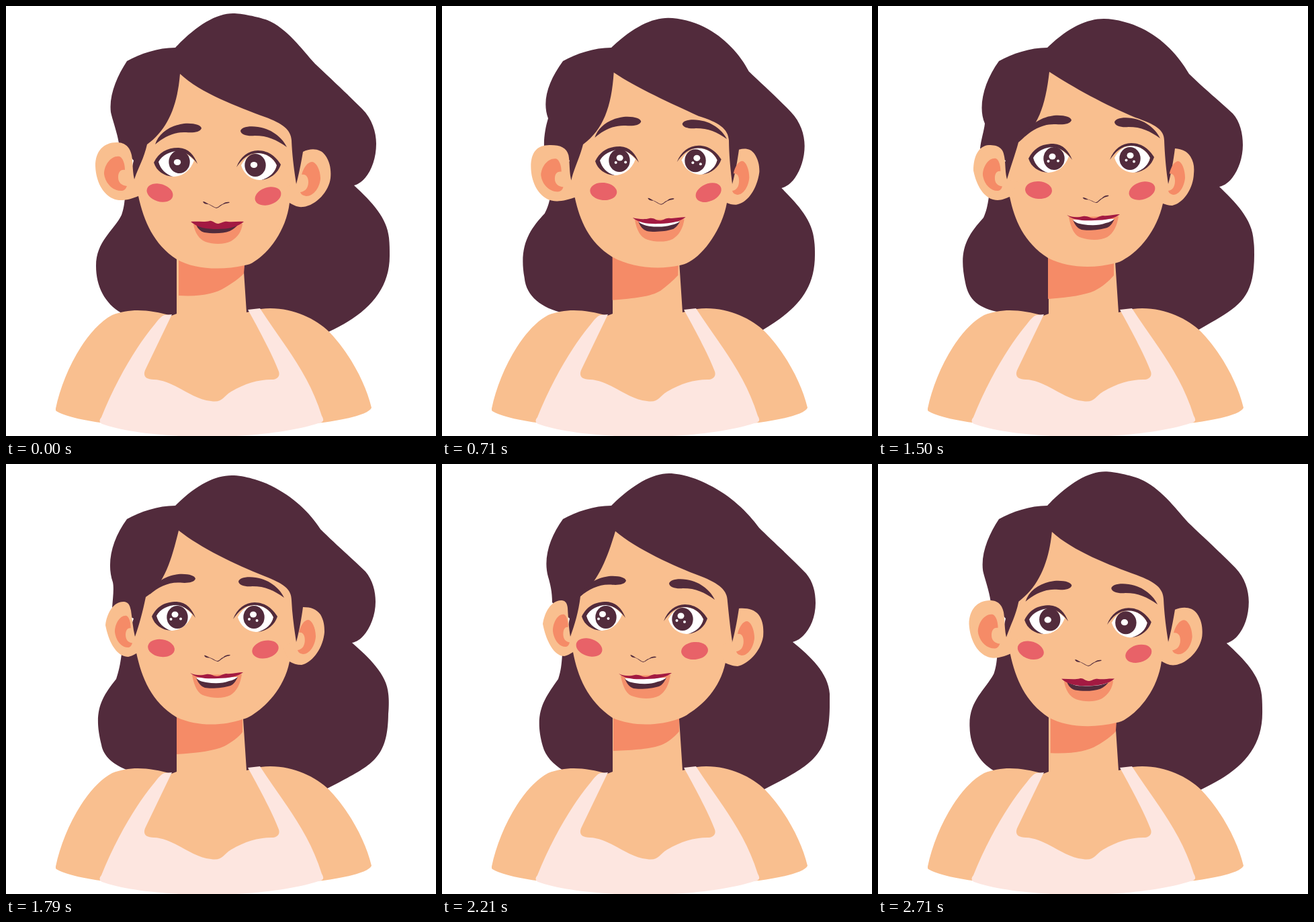
An HTML page for the animation above (2780 ms loop, 640x640 px).

```html
<!DOCTYPE html>
<html lang="en">
<head>
<meta charset="utf-8">
<title>Portrait</title>
<style>
html, body { margin: 0; width: 100%; height: 100%; overflow: hidden; background: #fff; }
svg { display: block; width: 100%; height: 100%; }
</style>
</head>
<body>
<svg id="stage" viewBox="0 0 640 640"></svg>
<script>
const NS = 'http://www.w3.org/2000/svg';
const stage = document.getElementById('stage');
const LOOP = 2780, STEPS = 39;
const HAIR = '#522b3c', SKIN = '#f9bf8f', BLUSH = '#e86268', SHADE = '#f58b67', DRESS = '#fde6e0', LIP = '#a31a42';
const TIMES = [0, 15, 16, 21, 25, 31, 32, 39];
const updates = [];

const mix = (a, b, u) => a.map((v, i) => v + (b[i] - v) * u);

// Five poses become a looping track whose turning points overshoot by one step.
function track(poses) {
  const [a, b, c, d, e] = poses;
  const vals = [a, b, mix(a, b, 16 / 15), c, d, e, mix(d, e, 7 / 6), a];
  return step => {
    let i = 0;
    while (step >= TIMES[i + 1]) i++;
    return mix(vals[i], vals[i + 1], (step - TIMES[i]) / (TIMES[i + 1] - TIMES[i]));
  };
}

function add(tag, attrs, parent = stage) {
  const el = document.createElementNS(NS, tag);
  for (const k in attrs) el.setAttribute(k, attrs[k]);
  return parent.appendChild(el);
}

const fixed = (fill, d, parent) => add('path', { fill, d }, parent);

function morph(fill, paths, parent) {
  const el = add('path', { fill }, parent);
  const num = /-?\d+(\.\d+)?/g;
  const gaps = paths[0].split(/-?\d+(?:\.\d+)?/);
  const at = track(paths.map(p => p.match(num).map(Number)));
  updates.push(s => {
    const v = at(s);
    el.setAttribute('d', gaps.map((g, i) => g + (i < v.length ? v[i].toFixed(2) : '')).join(''));
  });
}

// Poses are [x, y, angle].
function move(poses, parent) {
  const g = add('g', {}, parent), at = track(poses);
  updates.push(s => {
    const [x, y, r = 0] = at(s);
    g.setAttribute('transform', `translate(${x} ${y}) rotate(${r})`);
  });
  return g;
}

// Poses are [left, top, right, bottom, angle]; the first is the drawn size.
function fit(poses) {
  const g = add('g', {}), at = track(poses), [l, t, r, b] = poses[0];
  updates.push(s => {
    const [x, y, x2, y2, turn = 0] = at(s);
    g.setAttribute('transform', `translate(${(x + x2) / 2} ${(y + y2) / 2}) rotate(${turn}) ` +
      `scale(${(x2 - x) / (r - l)} ${(y2 - y) / (b - t)}) translate(${-(l + r) / 2} ${-(t + b) / 2})`);
  });
  return g;
}

const dot = (fill, cx, cy, rx, ry, parent) => add('ellipse', { fill, cx, cy, rx, ry }, parent);

// Hair
const crown = ' 180 82C200 71 226 62 252 62Z';
morph(HAIR, [
  'M252 62C283 29 313 11 338 11C350 11 375 16 389 21C418 33 440 64 460 86C480 105 505 128 530 153C545 168 551 188 551 205C551 235 537 262 518 267C545 292 567 315 570 345C571 355 571 362 571 372C571 425 535 460 480 485L300 500 172 457C147 443 134 417 134 387C134 350 160 335 172 311C175 302 176 296 177 285L190 230 168 204C166 190 158 168 156 158C153 133 165 105',
  'M252 62C283 34 311 21 336 21C355 21 375 27 390 36C422 53 446 77 455 103C470 118 490 135 514 160C528 175 534 193 534 210C534 238 519 268 499 273C520 295 544 320 546 352C547 358 547 364 547 370C547 425 520 450 476 481L300 500 185 457C150 453 121 441 117 413C104 360 116 331 143 308C148 300 150 295 153 285L190 230 144 212C144 200 152 186 159 172C146 145 155 115',
  'M252 62C283 32 311 19 336 19C355 19 378 26 392 33C425 49 448 75 463 101C480 118 503 137 528 160C539 172 543 190 543 207C543 235 528 265 508 269C530 290 558 317 559 350C560 357 560 362 560 370C560 440 535 448 477 482L300 500 182 456C150 450 135 438 130 412C120 365 130 345 157 315C161 306 163 298 165 284L190 230 152 212C153 200 158 185 159 175C148 150 158 112',
  'M252 62C283 31 311 17 336 17C355 17 380 25 394 32C428 49 452 72 468 97C486 115 512 138 535 160C546 173 550 190 550 205C550 233 534 263 515 266C540 288 567 313 569 342C570 350 570 360 569 372C568 440 545 448 478 483L300 500 182 456C160 448 145 435 142 418C130 370 140 350 164 320C168 308 170 298 172 283L190 230 158 214C159 200 161 185 159 176C149 147 158 112',
  'M252 62C283 31 313 14 338 14C357 14 383 23 397 31C430 47 455 72 472 95C490 113 518 138 542 163C552 175 556 190 556 207C556 235 541 260 522 265C548 286 575 311 577 342C577 350 577 356 577 362C576 435 550 448 480 484L300 500 180 456C165 446 154 435 150 420C136 370 152 350 173 320C177 308 178 298 179 283L190 230 164 206C164 190 161 178 158 168C150 140 161 108'
].map(p => p + crown));

// Body
fixed(SKIN, 'M74 599C85 545 120 480 158 460C185 449 215 452 246 461L254 458V365H352L358 456L379 451C420 446 458 463 481 485C510 515 535 560 544 598C540 607 510 615 472 620L300 630 140 620C110 616 80 608 74 602Z');
morph(SHADE, [
  'M257 365L257 431C290 433 312 428 326 419C336 413 347 406 354 398L356 375Z',
  'M252 365L252 441C285 436 310 435 325 426C335 418 343 409 350 402L350 375Z',
  'M253 365L253 436C285 434 308 430 322 424C334 418 344 409 351 401L351 375Z',
  'M254 365L254 432C285 430 310 427 325 420C336 414 346 407 352 399L352 375Z',
  'M255 365L255 427C285 426 312 424 327 418C337 414 346 406 353 398L353 375Z'
]);
fixed(DRESS, 'M236 460L247 459 208 540C203 550 207 556 220 556C250 557 275 585 305 588C322 591 322 582 335 574C355 562 375 556 395 556C405 556 408 550 406 544C395 515 370 470 360 452L378 450C410 500 450 545 470 610C474 617 472 619 468 620C420 636 350 641 306 641C240 641 180 635 143 622C138 619 139 616 142 612C165 555 195 505 222 473C228 465 232 461 236 460Z');

// Face
morph(SKIN, [
  'M259 101C290 130 345 150 385 165C412 175 424 184 425 200C426 225 429 245 432 265L422 293C417 335 390 368 370 380C365 384 360 385 355 386C320 394 280 392 254 377C220 355 205 320 197 283L191 258C197 240 205 228 210 206C240 184 255 150 259 101Z',
  'M254 98C290 118 340 143 380 163C412 172 427 182 428 200C428 225 430 245 432 265L425 293C417 330 390 370 367 381C362 384 357 385 353 386C320 393 280 387 252 371C218 350 205 318 198 286L193 260C197 240 205 225 210 206C240 184 251 150 254 98Z',
  'M255 98C290 121 340 148 383 166C412 176 426 184 426 200C427 225 429 245 432 265L424 294C415 335 388 365 368 376C362 380 357 382 352 383C320 391 282 390 253 375C217 352 203 318 196 284L192 258C197 240 203 225 209 203C238 180 249 150 255 98Z',
  'M257 99C290 125 340 149 385 167C413 178 425 186 425 203C426 225 429 245 432 265L422 294C414 335 385 362 366 374C361 377 357 379 352 380C320 391 282 390 254 377C216 354 202 318 194 281L192 257C198 240 203 222 208 198C237 180 248 135 257 99Z',
  'M258 100C290 127 345 152 385 167C413 178 425 188 425 205C427 225 429 245 432 264L422 295C414 335 386 360 368 371C363 375 358 377 353 379C320 391 282 390 254 378C216 352 202 316 195 280L191 257C197 240 203 222 206 197C236 172 249 130 258 100Z'
]);

// Ears
morph(SKIN, [
  'M187 222C184 207 174 203 165 203C145 203 133 216 133 238C134 268 151 291 174 289C185 288 191 285 200 282L210 262 191 258C188 245 189 232 187 222Z',
  'M189 222C186 213 178 209 160 209C140 208 132 218 132 240C133 250 132 256 136 262C147 288 160 292 174 291C185 290 190 288 198 286L210 262 193 260C190 248 191 232 189 222Z'.replace('C133 250 132 256 136 262C147 288 160 292 174 291', 'C132 272 152 294 174 291'),
  'M188 224C186 211 179 207 165 207C149 208 142 225 142 245C147 270 160 289 178 289C185 289 190 286 196 284L210 262 192 258C189 247 190 234 188 224Z',
  'M186 218C184 209 182 206 176 205C160 204 150 222 148 240C153 266 165 287 182 287C187 286 190 284 196 281L210 262 192 257C189 245 188 232 186 218Z',
  'M187 214C186 205 182 203 177 203C162 204 153 220 150 238C155 264 167 286 182 286C187 285 190 283 195 280L210 262 191 257C189 245 188 232 187 214Z'
]);
morph(SKIN, [
  'M442 217C454 211 468 212 475 222C483 233 484 246 483 256C481 275 462 297 442 299C434 300 427 296 422 293',
  'M442 212C450 211 456 213 460 219C465 227 467 234 467 243C463 270 452 291 436 294C432 294 428 294 425 293',
  'M442 212C453 213 460 216 465 224C470 232 471 240 470 250C469 272 455 293 438 297C432 297 428 295 424 294',
  'M442 213C454 213 462 216 468 224C473 233 474 240 474 250C472 275 455 296 440 299C433 299 427 297 422 294',
  'M442 215C455 214 465 217 471 224C478 233 479 245 478 257C474 280 455 298 440 301C433 301 427 298 421 296'
].map(p => p + 'L410 270 432 265C436 250 439 235 442 ' + p.match(/\d+/g)[1] + 'Z'));
fixed(SHADE, 'M169 224C157 222 146 236 146 250C148 265 160 276 173 275C178 274 179 270 180 268C172 267 167 263 167 255C167 248 170 243 177 244C177 235 174 226 169 224Z',
  fit([[146, 224, 180, 275], [148, 229, 181, 277], [156, 227, 185, 275], [162, 226, 188, 273], [165, 224, 190, 272]]));
fixed(SHADE, 'M456 232C462 233 468 244 468 257C467 270 458 283 447 283C441 282 439 280 438 277C446 276 450 270 450 262C450 254 446 250 440 251C443 240 449 232 456 232Z',
  fit([[438, 232, 468, 283], [429, 230, 452, 280], [432, 231, 457, 281], [434, 232, 461, 283], [438, 234, 465, 285]]));

// Brows
fixed(HAIR, 'M222 206C227 190 243 178 265 175C280 174 290 177 291 182C289 188 278 189 268 188C250 187 235 195 222 206Z',
  fit([[222, 175, 291, 206], [230, 160, 299, 191], [219, 163, 288, 194], [214, 164, 282, 194], [206, 167, 274, 197]]));
fixed(HAIR, 'M418 210C413 199 398 183 375 180C360 178 350 181 349 186C350 192 360 194 370 193C390 193 402 199 418 210Z',
  fit([[349, 179, 418, 210], [362, 164, 427, 192], [352, 166, 420, 197], [346, 168, 414, 199], [338, 171, 406, 202]]));

// Eyes
const single = [], triple = [];
function eye(boxes, white, lid, iris, glint, spot, shine) {
  const g = fit(boxes);
  fixed('#fff', white, g);
  fixed(HAIR, lid, g);
  const ball = move(iris);
  dot(HAIR, 0, 0, 15.7, 17, ball);
  single.push(dot('#fff', ...spot, 5.2, 4.6, ball));
  const lights = move(shine);
  dot('#fff', 0, 0, 5, 4.6, lights);
  glint.forEach(([x, y]) => dot('#fff', x, y, 2, 2, lights));
  triple.push(lights);
}
eye([[220, 211, 285, 255], [232, 208, 297, 252], [224, 205, 289, 249], [217, 205, 282, 249], [208, 205, 273, 249]],
  'M226 232C232 220 245 215 256 215C266 216 274 224 280 230C274 246 262 254 248 254C237 252 229 243 226 232Z',
  'M220 233C228 217 240 211 257 211C272 212 280 222 285 235C277 224 268 217 256 216C245 216 232 222 227 232C230 243 238 251 249 254C235 253 224 246 220 233Z',
  [[258, 232], [267, 229], [262, 227], [255, 228], [244, 228]], [[-6, 7], [8.5, 6.5]], [-3, 0.5],
  [[258, 228], [268, 225], [259.5, 224], [251.5, 224], [239, 223.5]]);
eye([[343, 215, 409, 259], [353, 204, 419, 247], [345, 204, 411, 248], [338, 206, 404, 250], [330, 209, 395, 253]],
  'M350 237C356 225 366 219 375 219C388 219 398 227 403 237C400 250 390 259 377 259C364 258 354 250 350 237Z',
  'M343 240C349 224 361 215 375 215C392 215 403 226 409 236C405 248 395 257 380 259C393 255 401 247 403 237C398 226 388 219 374 219C361 219 351 228 343 240Z',
  [[371, 237], [380, 227], [375, 227], [369, 228], [358, 231]], [[-6, 7], [5.5, 9]], [-2, -0.5],
  [[371, 233], [383.5, 223], [375.5, 222.5], [368, 224], [355.5, 226]]);

// Cheeks
dot(BLUSH, 0, 0, 20, 13, move([[229, 278, 17], [246, 275, 0], [239, 274, 4], [231, 274, 9], [219, 273, 18]]));
dot(BLUSH, 0, 0, 20, 13, move([[390, 283, -18], [400, 275, -26], [393, 275, -18], [386, 276, -13], [376, 278, -5]]));

// Nose
fixed(HAIR, 'M293 291C296 291 298 293 302 295C308 297 310 300 313 300C316 300 318 296 322 295C325 292 330 291 333 292C332 294 328 293 324 295C319 297 316 301 313 301C309 300 306 297 301 295C297 295 294 294 293 291Z',
  fit([[293, 291, 333, 301], [313, 283, 352, 293, -8], [305, 283, 344, 293, -6], [295, 284, 334, 294, -2], [280, 285, 319, 295, 3]]));

// Mouth
const mouth = move([[275, 321], [288, 312], [281, 311], [274, 311], [263, 312]]);
const lips = (fill, shut, open) => morph(fill, [shut, open, open, open, open], mouth);
lips('#f5906b', 'M4 4C6 16 12 26 22 30C34 34 50 34 60 29C70 23 76 14 77 3Z',
  'M3 3C6 20 12 32 22 34C35 38 50 38 60 33C70 27 75 15 77 2Z');
lips(HAIR, 'M8 4C10 10 14 14 20 16C32 18 48 18 58 14C64 11 67 8 70 5Z',
  'M9 7C12 15 16 20 22 22C32 24 50 22 60 19C65 17 68 12 71 6Z');
lips('#fff', 'M8 4C14 7 20 9 26 10C36 10 46 10 56 9C62 8 67 6 70 5Z',
  'M9 7C12 11 17 13 24 14C36 16 48 16 58 12C64 11 68 8 71 6Z');
lips(LIP, 'M0 0C10 -1 20 1 28 -1C33 -2 35 3 41 3C47 2 49 -1 55 0C63 1 71 -1 79 0C70 8 55 11 40 11C23 11 10 9 0 0Z',
  'M0 0C8 4 17 4 24 2C32 1 34 5 40 5C45 5 49 1 54 1C62 2 72 -1 79 -1C72 5 57 8 42 8C24 9 10 8 0 0Z');

function draw(ms) {
  const step = Math.min(STEPS - 1, Math.floor((ms % LOOP + 5) * STEPS / LOOP));
  updates.forEach(f => f(step));
  const bright = step >= 9 && step < 35;
  single.forEach(e => e.setAttribute('visibility', bright ? 'hidden' : 'visible'));
  triple.forEach(e => e.setAttribute('visibility', bright ? 'visible' : 'hidden'));
}

const start = performance.now();
function tick() {
  draw(performance.now() - start);
  requestAnimationFrame(tick);
}
tick();
</script>
</body>
</html>
```
